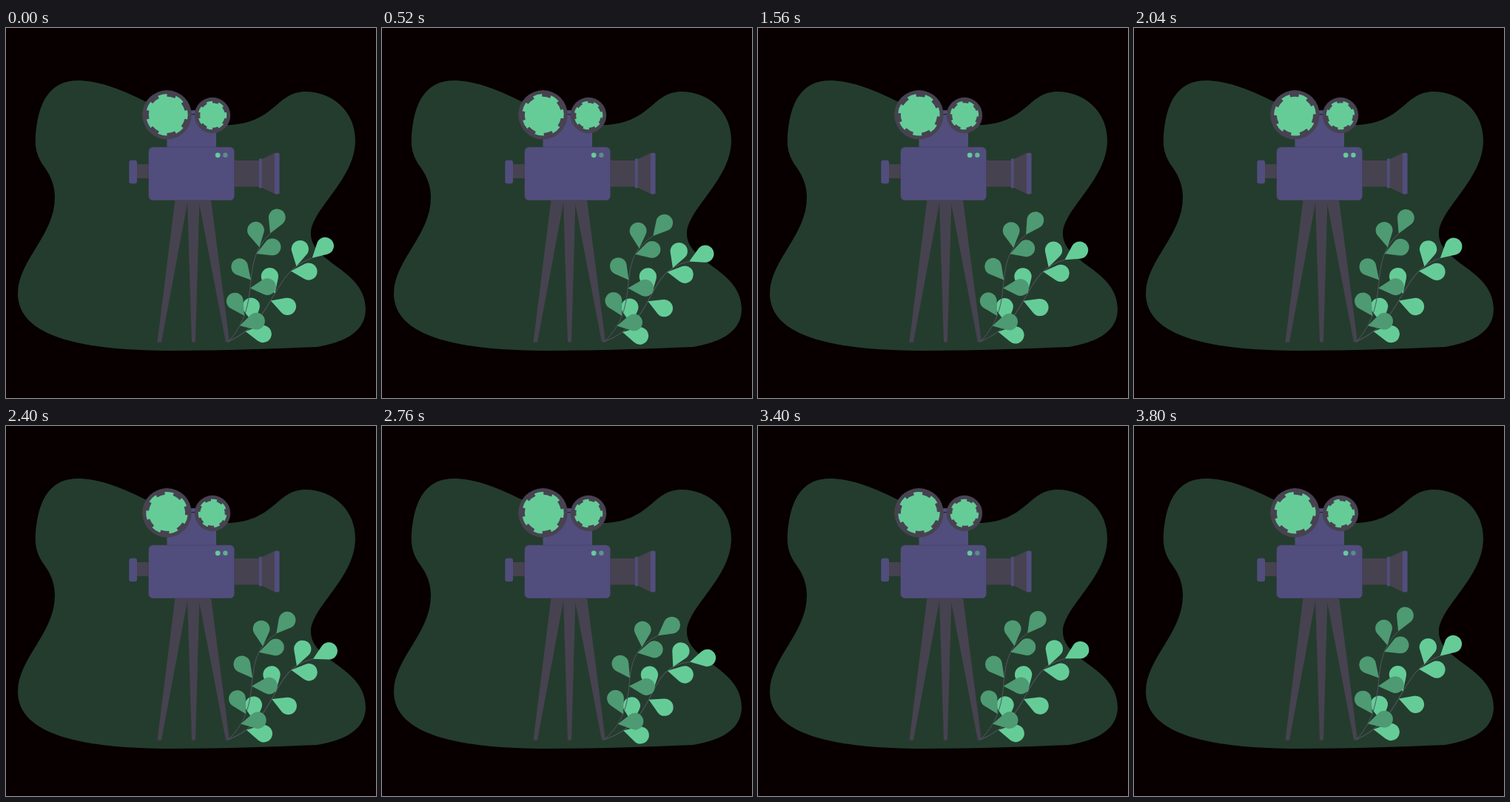
Animation, 500 px wide and 500 px high, one loop 3840 ms. Source, as an HTML page with a canvas:

```html
<!DOCTYPE html>
<html lang="en">
<head>
<meta charset="utf-8">
<title>Film camera</title>
<style>
html, body { margin: 0; width: 100%; height: 100%; overflow: hidden; background: #080000; }
canvas { display: block; }
</style>
</head>
<body>
<canvas id="stage" width="500" height="500"></canvas>
<script>
const ctx = document.getElementById('stage').getContext('2d');
const LOOP = 3840, STEP = 40, TAU = Math.PI * 2, DEG = Math.PI / 180;
const INK = '#474250', PURPLE = '#514e7d', GREEN = '#65cc98', LEAF = '#4e9a73';

const blob = new Path2D(`M97 71 C62 71 46 96 41 135 C37 163 43 175 52 188 C62 202 66 215 66 229
  C66 280 16 314 16 359 C16 418 105 436 225 436 C300 436 365 433 420 431 C450 426 486 414 486 380
  C486 326 412 318 412 278 C412 245 472 205 472 152 C472 112 440 86 405 86
  C365 86 365 127 303 131 C255 132 225 117 190 100 C150 80 122 71 97 71 Z`);

function box(x, y, w, h, color, radius = 0) {
  ctx.fillStyle = color;
  ctx.beginPath();
  ctx.roundRect(x, y, w, h, radius);
  ctx.fill();
}

function disc(x, y, r, color) {
  ctx.fillStyle = color;
  ctx.beginPath();
  ctx.arc(x, y, r, 0, TAU);
  ctx.fill();
}

// Four-sided shape between two horizontal edges.
function taper(left1, right1, y1, left2, right2, y2) {
  ctx.fillStyle = INK;
  ctx.beginPath();
  ctx.moveTo(left1, y1);
  ctx.lineTo(right1, y1);
  ctx.lineTo(right2, y2);
  ctx.lineTo(left2, y2);
  ctx.fill();
}

function reel(x, y, rim, angle) {
  const teeth = 7, pitch = TAU / teeth, half = pitch / 4;
  const outer = rim - 4.9, inner = outer * .87;
  disc(x, y, rim, INK);
  ctx.fillStyle = GREEN;
  ctx.beginPath();
  for (let i = 0; i < teeth; i++) {
    const a = angle + i * pitch;
    ctx.arc(x, y, outer, a - half, a + half);
    ctx.arc(x, y, inner, a + half, a + pitch - half);
  }
  ctx.fill();
}

// Stem as a cubic curve growing from the origin; bend moves its control points.
function stemCurve(bend, [tipX, tipY]) {
  return [
    [0, 0],
    [48 + 11 * bend, -55 + 2 * bend],
    [12 - 5.5 * bend, -104 - 4 * bend],
    [56 + tipX * bend, -146 + tipY * bend]
  ];
}

const mix = (p, q, t) => [p[0] + (q[0] - p[0]) * t, p[1] + (q[1] - p[1]) * t];

function along(curve, t) {
  let points = curve;
  while (points.length > 2) points = points.slice(1).map((q, i) => mix(points[i], q, t));
  const [p, q] = points;
  return { point: mix(p, q, t), angle: Math.atan2(q[1] - p[1], q[0] - p[0]) };
}

function drawLeaf([x, y], angle) {
  const r = 11.4, length = 23.5, side = Math.PI - Math.acos(r / length);
  ctx.save();
  ctx.translate(x, y);
  ctx.rotate(angle);
  ctx.beginPath();
  ctx.moveTo(0, 0);
  ctx.arc(length, 0, r, -side, side);
  ctx.fill();
  ctx.restore();
}

function drawBranch(color, tilt, size, bend, tipShift) {
  const rest = stemCurve(0, tipShift), curve = stemCurve(bend, tipShift);
  const leafAt = (t, spread) => {
    const turn = spread + bend * (7 + 24 * t ** 7);
    drawLeaf(along(curve, t).point, along(rest, t).angle + turn * DEG);
  };
  ctx.save();
  ctx.translate(301, 423.5);
  ctx.rotate(tilt * DEG);
  ctx.scale(size, size);
  ctx.strokeStyle = '#535461';
  ctx.lineWidth = 1;
  ctx.beginPath();
  ctx.moveTo(0, 0);
  ctx.bezierCurveTo(...curve.slice(1).flat());
  ctx.stroke();
  ctx.fillStyle = color;
  for (let i = 0; i < 3; i++) {
    leafAt(.13 + .33 * i, 46 + 33 * (i % 2));
    leafAt(.215 + .32 * i, -53 + 6 * i);
  }
  leafAt(1, -23);
  ctx.restore();
}

function drawCamera(phase) {
  taper(228.5, 246, 232, 204.5, 210, 424.5);
  taper(245, 261.5, 232, 251, 256, 424.5);
  taper(260, 277, 232, 297, 302, 424.5);

  box(217.5, 111.5, 66.5, 50, PURPLE);
  box(246, 111, 14, 1, INK);
  box(246, 116, 14, 1.2, '#25222d');
  reel(217.5, 117.3, 33.2, phase * TAU);
  reel(279, 118, 24.2, phase * TAU);

  box(176, 184, 18, 19, INK);
  box(166.3, 178.8, 10.7, 31.5, PURPLE, 3);
  box(308, 179, 35, 35.5, INK);
  ctx.save();
  ctx.translate(345, 196.5);
  ctx.rotate(-Math.PI / 2);
  taper(-19, 19, 0, -28, 28, 19);
  ctx.restore();
  box(342, 176.5, 3.5, 40, PURPLE, 1);
  box(362.8, 168.8, 6.8, 55.7, PURPLE, 2);
  box(192.5, 160.7, 116.3, 72.3, '#413d58', 6);
  box(193, 161.3, 115.3, 71.2, PURPLE, 5.5);

  disc(286.2, 171.8, 3.4, GREEN);
  ctx.globalAlpha = .5 + .5 * Math.sin(phase * Math.PI) ** 8;
  disc(296.4, 171.8, 3.2, GREEN);
  ctx.globalAlpha = 1;
}

function draw(now) {
  const phase = Math.floor(now % LOOP / STEP) * STEP / LOOP;
  const bend = (1 - Math.cos(phase * 2 * TAU)) / 2;
  ctx.fillStyle = '#080000';
  ctx.fillRect(0, 0, 500, 500);
  ctx.fillStyle = '#243c2d';
  ctx.fill(blob);
  drawCamera(phase);
  drawBranch(GREEN, 24, 1.02, bend, [5.5, 6.5]);
  drawBranch(LEAF, 0, 1, bend, [16.5, 6]);
}

const start = performance.now();
function tick() {
  draw(performance.now() - start);
  requestAnimationFrame(tick);
}
tick();
</script>
</body>
</html>
```
